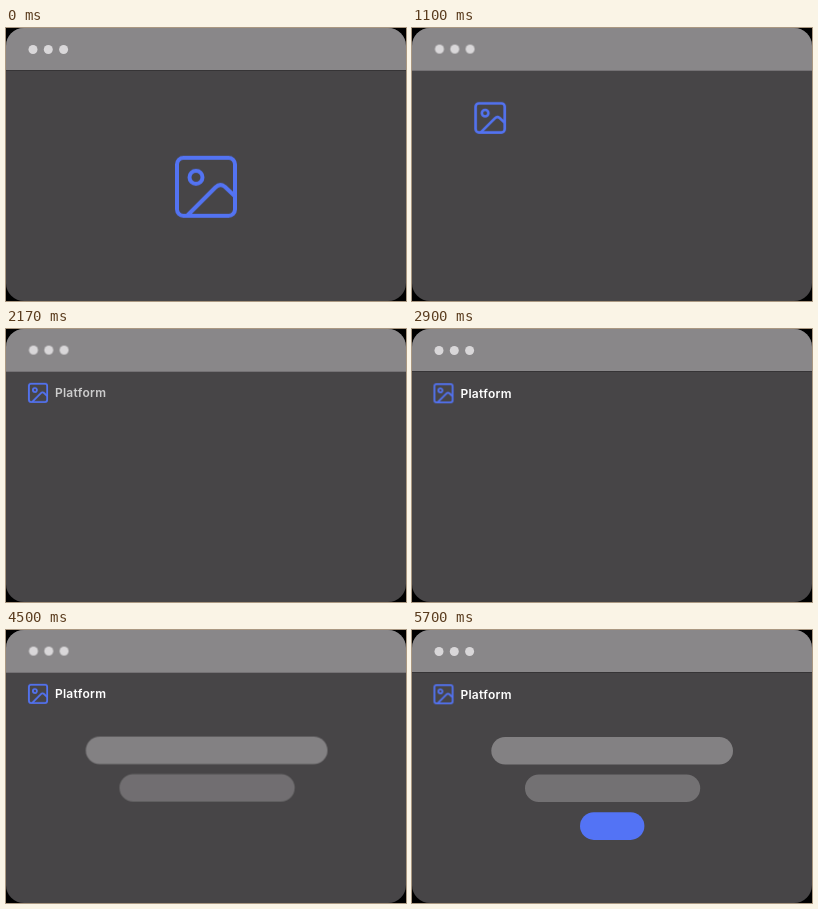
Animation, 400 px wide and 273 px high, one loop 6.5 s. Source, as an HTML page:

```html
<!DOCTYPE html>
<html lang="en">
<head>
<meta charset="utf-8">
<title>Page assembling</title>
<style>
  html, body { margin: 0; width: 100%; height: 100%; overflow: hidden; background: #000; }
  svg { display: block; width: 100vw; height: 100vh; }

  .layer, .edge, .icon, .title, .wide, .mid, .button {
    animation: 6.5s linear infinite;
  }

  /* The layer sits half a pixel off while anything is moving */
  .layer { animation-name: nudge; animation-timing-function: step-end; }
  .edge { animation-name: edge; animation-timing-function: step-end; }
  @keyframes nudge {
    0%, 20%, 35.846%, 53.385%, 71.231%, 87.692%, 100% { transform: none; }
    15.385%, 31.846%, 48.769%, 66.154%, 83.538% { transform: translate(.5px, -.4px); }
  }
  @keyframes edge {
    0%, 20%, 35.846%, 53.385%, 71.231%, 87.692%, 100% { opacity: 1; }
    15.385%, 31.846%, 48.769%, 66.154%, 83.538% { opacity: 0; }
  }

  .icon {
    fill: none;
    stroke: #5373f2;
    stroke-linejoin: round;
    animation-name: dock;
  }
  @keyframes dock {
    0%, 15.384% { transform: translate(200px, 158.8px) scale(1); stroke-width: 4px; }
    15.385% {
      transform: translate(156.2px, 134.6px) scale(.822);
      stroke-width: 4.44px;
      animation-timing-function: cubic-bezier(.333, .667, .667, 1);
    }
    19.354%, 100% { transform: translate(31.5px, 64.3px) scale(.314); stroke-width: 5.7px; }
  }

  .title {
    font: 600 12px Inter, "Open Sans", sans-serif;
    letter-spacing: .3px;
    fill: #fff;
    animation-name: title;
  }
  .wide { fill: #838183; animation-name: wide; }
  .mid { fill: #737173; animation-name: mid; }
  .button { fill: #5373f5; animation-name: button; }

  /* Each fade opens with a jump, then eases out */
  @keyframes title {
    0%, 31.845% { opacity: 0; }
    31.846% { opacity: .26; animation-timing-function: cubic-bezier(.333, .667, .667, 1); }
    35.815%, 100% { opacity: 1; }
  }
  @keyframes wide {
    0%, 48.768% { opacity: 0; }
    48.769% { opacity: .26; animation-timing-function: cubic-bezier(.333, .667, .667, 1); }
    52.738%, 100% { opacity: 1; }
  }
  @keyframes mid {
    0%, 66.153% { opacity: 0; }
    66.154% { opacity: .26; animation-timing-function: cubic-bezier(.333, .667, .667, 1); }
    70.123%, 100% { opacity: 1; }
  }
  @keyframes button {
    0%, 83.537% { opacity: 0; }
    83.538% { opacity: .26; animation-timing-function: cubic-bezier(.333, .667, .667, 1); }
    87.507%, 100% { opacity: 1; }
  }
</style>
</head>
<body>
<svg viewBox="0 0 400 273">
  <clipPath id="window"><rect width="400" height="273" rx="18"/></clipPath>
  <g clip-path="url(#window)">
    <rect width="400" height="273" fill="#474547"/>
    <rect width="400" height="42.7" fill="#898789"/>
    <rect class="edge" y="42" width="400" height="1" fill="#363436"/>
  </g>
  <g class="layer">
    <g fill="#d9d7d9">
      <circle cx="27" cy="21.5" r="4.5"/>
      <circle cx="42.3" cy="21.5" r="4.5"/>
      <circle cx="57.6" cy="21.5" r="4.5"/>
    </g>
    <g class="icon">
      <rect x="-29" y="-29" width="58" height="58" rx="6.5"/>
      <circle cx="-10" cy="-9.5" r="6.5"/>
      <path d="M-19 29 L9.5 .5 Q14 -4 18.7 -.2 L29 9.5"/>
    </g>
    <text class="title" x="48.4" y="68.5">Platform</text>
    <rect class="wide" x="79.3" y="107" width="241.7" height="27.6" rx="13.8"/>
    <rect class="mid" x="113" y="144.5" width="175.2" height="27.6" rx="13.8"/>
    <rect class="button" x="168" y="182.3" width="64.4" height="27.6" rx="13.8"/>
  </g>
</svg>
</body>
</html>
```
